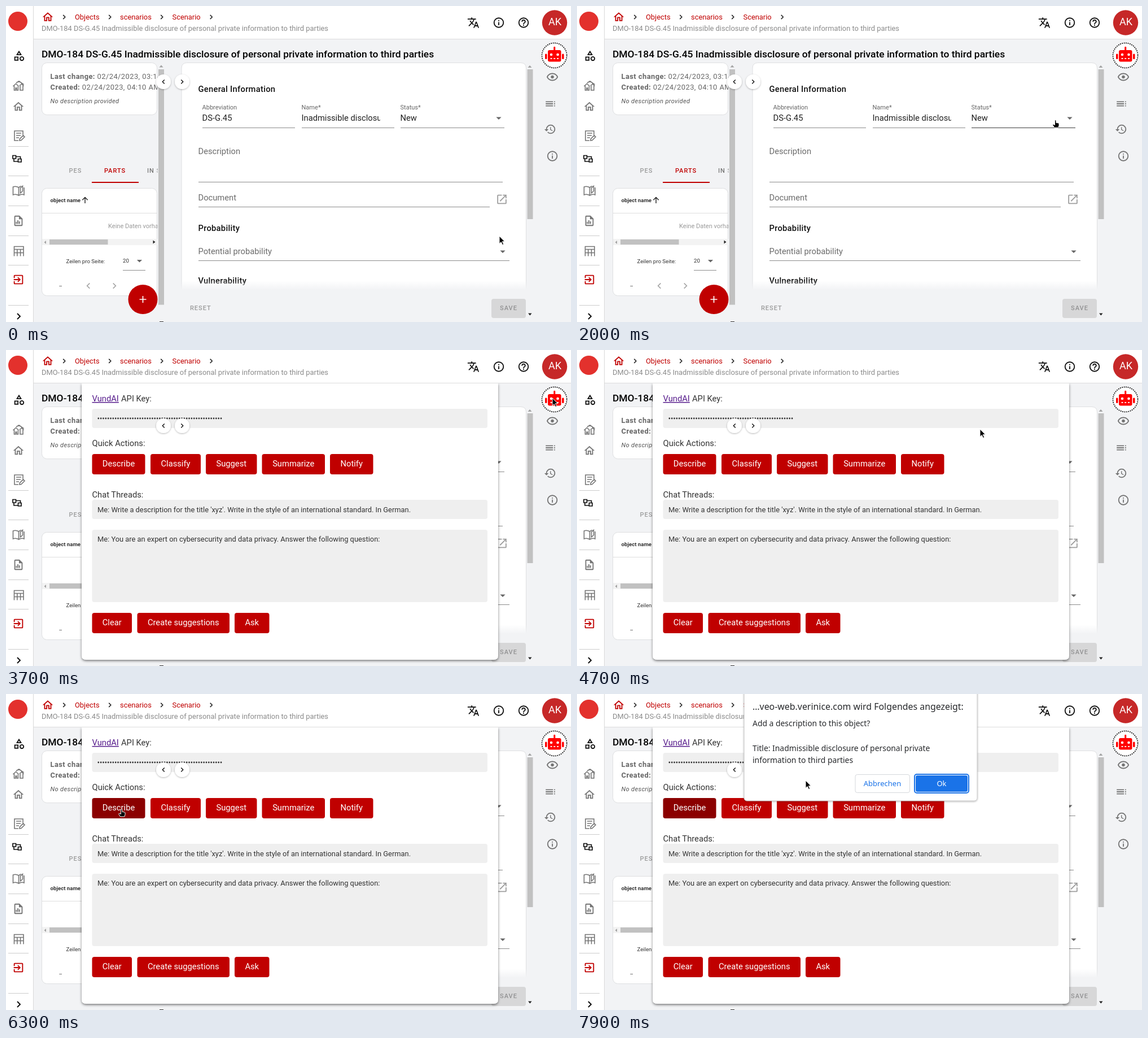
These frames come from a looping animation (1001 by 559 pixels, 8000 ms). An HTML page:

```html
<!DOCTYPE html>
<html lang="en">
<head>
<meta charset="utf-8">
<title>Scenario form</title>
<style>
html, body { margin: 0; width: 100%; height: 100%; overflow: hidden; background: #f2f3f5; }
svg { display: block; width: 100vw; height: 100vh; }
text { font: 14.72px Roboto, sans-serif; fill: #212121; white-space: pre; }
.crumb { font-size: 12.88px; fill: #c00000; }
.sub { font-size: 12.88px; fill: #8b8b8b; }
.title { font-size: 17.42px; font-weight: 500; fill: #000; }
.head { font-weight: 500; letter-spacing: .28px; fill: #111; }
.label { font-size: 11.04px; fill: #666; }
.hint { fill: #6b6b6b; }
.meta { font-size: 12.88px; letter-spacing: .45px; fill: #666; }
.meta tspan { font-weight: 700; }
.note { font-size: 11.04px; font-style: italic; letter-spacing: .37px; fill: #555; }
.cap { font-size: 11.04px; font-weight: 500; letter-spacing: .98px; fill: #9b9b9b; }
.tiny { font-size: 9.66px; fill: #333; }
.msg { font-size: 12.88px; fill: #333; }
.soft { fill: #333; }
.mid { text-anchor: middle; }
.ask text { font: 13.9px "Noto Sans", sans-serif; fill: #26282b; }
.ask .big { font-size: 15.9px; }
.ask .btn { font-size: 13px; text-anchor: middle; }
</style>
</head>
<body>
<script>
const RED = '#c00000', GREY = '#757575', LOOP = 8000, STEP = 100;

const paths = {
  home: 'M12 5.69l5 4.5V18h-2v-6H9v6H7v-7.81l5-4.5M12 3L2 12h3v8h6v-6h2v6h6v-8h3z',
  translate: 'M12.87 15.07l-2.54-2.51.03-.03A17.52 17.52 0 0 0 14.07 6H17V4h-7V2H8v2H1v2h11.17C11.5 7.92 10.44 9.75 9 11.35 8.07 10.32 7.3 9.19 6.69 8h-2c.73 1.63 1.73 3.17 2.98 4.56l-5.09 5.02L4 19l5-5 3.11 3.11zM18.5 10h-2L12 22h2l1.12-3h4.75L21 22h2zm-2.62 7l1.62-4.33L19.12 17z',
  info: 'M11 17h2v-6h-2zM12 2a10 10 0 1 0 0 20 10 10 0 0 0 0-20zm0 18a8 8 0 1 1 0-16 8 8 0 0 1 0 16zM11 9h2V7h-2z',
  help: 'M11 18h2v-2h-2zM12 2a10 10 0 1 0 0 20 10 10 0 0 0 0-20zm0 18a8 8 0 1 1 0-16 8 8 0 0 1 0 16zm0-14a4 4 0 0 0-4 4h2c0-1.1.9-2 2-2s2 .9 2 2c0 2-3 1.75-3 5h2c0-2.25 3-2.5 3-5a4 4 0 0 0-4-4z',
  eye: 'M12 9a3 3 0 1 1 0 6 3 3 0 0 1 0-6m0-4.5c5 0 9.27 3.11 11 7.5-1.73 4.39-6 7.5-11 7.5S2.73 16.39 1 12c1.73-4.39 6-7.5 11-7.5M3.18 12a9.82 9.82 0 0 0 17.64 0 9.82 9.82 0 0 0-17.64 0z',
  toc: 'M3 9h14V7H3zm0 4h14v-2H3zm0 4h14v-2H3zm16 0h2v-2h-2zm0-10v2h2V7zm0 6h2v-2h-2z',
  history: 'M13.5 8H12v5l4.28 2.54.72-1.21-3.5-2.08V8M13 3a9 9 0 0 0-9 9H1l3.96 4.03L9 12H6a7 7 0 1 1 7 7c-1.93 0-3.68-.79-4.94-2.06l-1.42 1.42A8.9 8.9 0 0 0 13 21a9 9 0 0 0 0-18',
  shapes: 'M11 13.5v8H3v-8h8m-2 2H5v4h4v-4M12 2l5.5 9h-11L12 2m0 3.86L10.08 9h3.84zM17.5 13a4.5 4.5 0 1 1 0 9 4.5 4.5 0 0 1 0-9m0 2a2.5 2.5 0 1 0 0 5 2.5 2.5 0 0 0 0-5z',
  chart: 'M14 2H6a2 2 0 0 0-2 2v16a2 2 0 0 0 2 2h12a2 2 0 0 0 2-2V8l-6-6m4 18H6V4h7v5h5v11M9 14v4H7v-4h2m6-1v5h-2v-5h2m-3-2v7h-2v-7z',
  exit: 'M19 3H5a2 2 0 0 0-2 2v4h2V5h14v14H5v-4H3v4a2 2 0 0 0 2 2h14a2 2 0 0 0 2-2V5a2 2 0 0 0-2-2M10.08 15.58L11.5 17l5-5-5-5-1.42 1.41L12.67 11H3v2h9.67z',
  open: 'M14 3v2h3.59l-9.83 9.83 1.41 1.41L19 6.41V10h2V3m-2 16H5V5h7V3H5a2 2 0 0 0-2 2v14a2 2 0 0 0 2 2h14a2 2 0 0 0 2-2v-7h-2z'
};

const text = (x, y, cls, s, extra = '') => `<text x="${x}" y="${y}" class="${cls}" ${extra}>${s}</text>`;
const rect = (x, y, w, h, fill, r = 0, extra = '') =>
  `<rect x="${x}" y="${y}" width="${w}" height="${h}" rx="${r}" fill="${fill}" ${extra}/>`;
const line = (x1, x2, y, color = '#8c8c8c', id = '') => rect(x1, y, x2 - x1, 1, color, 0, id && `id="${id}"`);
const icon = (name, cx, cy, color = GREY, k = .92) =>
  `<path transform="translate(${cx - 12 * k} ${cy - 12 * k}) scale(${k})" fill="${color}" fill-rule="evenodd" d="${paths[name]}"/>`;
const stroke = (d, color = GREY, w = 1.6) => `<path d="${d}" fill="none" stroke="${color}" stroke-width="${w}"/>`;
const chevron = (cx, cy, dir, r = 4, color = '#111', w = 1.7) =>
  stroke(`M${cx - dir * r / 2} ${cy - r}l${dir * r} ${r}l${-dir * r} ${r}`, color, w);
const caret = (cx, cy, color = '#666') => `<path d="M${cx - 4.6} ${cy - 2}h9.2l-4.6 4.6z" fill="${color}"/>`;
const tri = (d, color) => `<path d="${d}z" fill="${color}"/>`;
const round = (cx, dir) =>
  `<circle cx="${cx}" cy="134" r="13" fill="#fff" filter="url(#drop)"/>` + chevron(cx, 134, dir, 3.5, '#111', 1.4);
const button = (x1, x2, y, s) =>
  rect(x1, y, x2 - x1, 36, RED, 4, `id="${s.split(' ')[0]}"`) + text((x1 + x2) / 2, y + 22, 'mid', s, 'style="fill:#fff"');

const full = 'DMO-184 DS-G.45 Inadmissible disclosure of personal private information to third parties';

const sidebar = rect(0, 0, 48, 559, '#fff') + rect(48, 0, 1, 559, '#d9d9d9') +
  `<circle cx="21" cy="27" r="17" fill="#e3312d"/>` +
  icon('shapes', 23, 88, '#111') +
  stroke('M12.5 142l5-4.5l5 4.5M14.5 141v8h2.5v-4h2v4h2.5v-8M18 136l5-3l8.5 6M24 141l3.5-3l4 3.5M25 141v8h5v-8') +
  icon('home', 22, 178) +
  stroke('M30 228v-7h-15v17h7M18 225h9M18 229h8M18 233h5M24 238l.5-3l6-6l2.5 2.5l-6 6z') +
  stroke('M12 264.500h5.500v5.500h-5.500zM21.500 270.500h5.500v5.500h-5.500zM17.500 266.500h8v4M14 270v5h7.500', '#111', 1.7) +
  stroke('M22.5 321q-5-3-10-1v14q5-2 10 1zq5-3 4-2M22.5 335q5-3 9.5-1v-13M25.5 322v9l4-3.5v-9z') +
  icon('chart', 22, 380) +
  stroke('M14.500 425.500h16.500v5h-16.500zM14.500 430.500v12M31 430.500v12M14 436.500h17M19.800 431v11.500M25.600 431v11.500') +
  icon('exit', 22, 484, RED) + chevron(22.5, 549, 1, 5, '#111', 2) +
  [248, 300, 353, 406, 458, 529].map(y => line(4, 40, y, '#ccc')).join('');

const header = rect(49, 0, 952, 58, '#fff') + rect(49, 58, 952, 1, '#dcdcdc') +
  icon('home', 74, 19.5, RED) +
  [103, 184, 276, 363.5].map(x => chevron(x, 19.5, 1, 3.6, '#222', 1.5)).join('') +
  text(122, 24, 'crumb', 'Objects') + text(202, 24, 'crumb', 'scenarios') + text(294.5, 24, 'crumb', 'Scenario') +
  text(63, 44, 'sub', full) +
  icon('translate', 828, 29.5, '#111') + icon('info', 873, 29.5, '#111') + icon('help', 917, 29.5, '#111') +
  `<circle cx="972" cy="29.5" r="22.2" fill="#c62828"/>` +
  text(972.5, 34, 'mid', 'AK', 'style="fill:#fff;font-size:18px"');

const robot = `<circle cx="971.5" cy="87.5" r="22" fill="#fff" stroke="#111" stroke-width="1.8" stroke-dasharray="1.8 1.656"/>` +
  rect(960, 78, 23.5, 20.5, '#f00', 3) + rect(970.2, 72, 3, 8, '#f00', 1) +
  rect(955, 84.5, 3.5, 9.5, '#f00', 1.5) + rect(985, 84.5, 3.5, 9.5, '#f00', 1.5) +
  [966, 977.5].map(x => `<circle cx="${x}" cy="86" r="2.3" fill="#fff"/>`).join('') +
  [964.5, 970.2, 976].map(x => rect(x, 92, 3, 1.8, '#fff')).join('');

const tools = robot + icon('eye', 968, 125.5) + icon('toc', 964.5, 173) +
  icon('history', 964, 218) + icon('info', 968, 265.5);

const card = 'stroke="#dedfe1"';
const left = `<g clip-path="url(#leftClip)">` +
  rect(63.5, 100.5, 204, 92, '#fff', 9, card) +
  text(78.5, 129, 'meta', '<tspan>Last change:</tspan> 02/24/2023, 03:14 PM') +
  text(78.5, 148, 'meta', '<tspan>Created:</tspan> 02/24/2023, 04:10 AM') +
  text(78.5, 172, 'note', 'No description provided') +
  text(111.5, 295, 'cap', 'PES') + text(174, 295, 'cap', 'PARTS', 'style="fill:#c00000"') +
  text(250, 295, 'cap', 'IN SCOPES', 'style="fill:#777"') + rect(152, 311, 83, 2, RED) +
  rect(63.5, 322.5, 204, 190, '#fff', 9, card) +
  text(78.5, 347, 'tiny', 'object name', 'style="font-weight:700"') +
  stroke('M140 349v-10.5M135.3 343.3l4.7-4.7l4.7 4.7', '#222', 1.4) + line(64, 268, 366, '#dedede') +
  text(181, 393, 'label', 'Keine Daten vorhanden', 'style="fill:#999"') +
  rect(64, 412, 204, 11, '#f3f3f3') + rect(77, 413, 103.5, 9, '#c1c1c1') +
  tri('M71 415v6l-3.5-3', '#a3a3a3') + tri('M260.5 414.5v6l4-3', '#222') +
  text(106.5, 455, 'tiny', 'Zeilen pro Seite:') + text(207, 454, 'tiny', '20') +
  caret(236.5, 451) + line(207, 247, 467) + text(93.5, 499, 'tiny', '–') +
  chevron(146, 495, -1, 4.6, '#a6a6a6') + chevron(192, 495, 1, 4.6, '#a6a6a6') + `</g>` +
  tri('M271.5 108.5h7l-3.5-4', '#a3a3a3') + rect(270, 112, 10, 416.5, '#c1c1c1') + rect(272, 558, 7, 1, '#333') +
  `<circle cx="242.5" cy="519" r="26" fill="${RED}"/>` + stroke('M236.5 519h12M242.5 513v12', '#fff', 1.7);

const form = `<path d="M311 559V110q0-9.5 9.5-9.5H912q9.5 0 9.5 9.5V559" fill="#fff" stroke="#dedfe1"/>` +
  text(340.5, 152, 'head', 'General Information') +
  text(347.5, 183, 'label', 'Abbreviation') + text(523.5, 183, 'label', 'Name*') + text(698.5, 183, 'label', 'Status*') +
  text(347.5, 203, '', 'DS-G.45') + text(523.5, 203, '', 'Inadmissible disclosure', 'clip-path="url(#nameClip)"') +
  text(698.5, 203, '', 'New') + caret(873, 198.5) +
  line(348, 512, 215) + line(524, 688, 215) + line(699, 883, 215, '#8c8c8c', 'status') +
  text(340.5, 262, 'hint', 'Description') + line(341, 880, 311, '#8c8c8c', 'desc') +
  text(340.5, 344, 'hint', 'Document') + line(341, 857, 355) + icon('open', 878.5, 342, '#9e9e9e') +
  text(340.5, 398, 'head', 'Probability') +
  text(340.5, 439, 'hint', 'Potential probability') + caret(880, 434.5) + line(341, 892, 450) +
  text(340.5, 491, 'head', 'Vulnerability') +
  rect(308, 486, 615, 16, 'url(#fade)') + rect(308, 502, 615, 57, '#f2f3f5') +
  text(326, 538, 'cap', 'RESET') + rect(860, 518, 61, 34, '#d7d7d8', 4) +
  text(875, 538, 'cap', 'SAVE', 'style="fill:#929293"') +
  tri('M924.5 109h7l-3.5-4', '#a3a3a3') + rect(923.5, 112, 10, 265, '#c1c1c1') + tri('M925 543.5h6.5l-3.25 4', '#222');

const modal = `<g id="modal"><path d="M134 59H872V540q0 8-8 8H142q-8 0-8-8z" fill="#fff" filter="url(#deep)"/>` +
  text(152.5, 91, '', 'VundAI', 'style="fill:#551a8b;text-decoration:underline"') + text(204, 91, 'soft', 'API Key:') +
  rect(152.5, 104, 700.5, 34, '#efefef', 4) +
  `<path d="M163.8 121H381.5" stroke="#333" stroke-width="2.8" stroke-linecap="round" stroke-dasharray="0 4.345"/>` +
  text(152.5, 170, 'soft', 'Quick Actions:') +
  button(152.5, 246.5, 184, 'Describe') + button(256, 345, 184, 'Classify') + button(354, 444.5, 184, 'Suggest') +
  button(453.5, 565, 184, 'Summarize') + button(574, 650.5, 184, 'Notify') +
  text(152.5, 261, 'soft', 'Chat Threads:') + rect(152.5, 265, 700.5, 34, '#efefef', 4) +
  text(162, 287, 'msg', "Me: Write a description for the title 'xyz'. Write in the style of an international standard. In German.") +
  rect(152.5, 318, 700.5, 128, '#efefef', 4) +
  text(162, 339, 'msg', 'Me: You are an expert on cybersecurity and data privacy. Answer the following question:') +
  button(152.5, 223, 465, 'Clear') + button(232.5, 396, 465, 'Create suggestions') + button(405, 466.5, 465, 'Ask') + `</g>`;

const ask = `<g id="ask" class="ask">` + rect(296, -12, 413, 201, '#fff', 5, 'stroke="#c4c4c4" filter="url(#drop)"') +
  text(311, 28, 'big', '…veo-web.verinice.com wird Folgendes angezeigt:') +
  text(311, 57, '', 'Add a description to this object?') +
  text(311, 101, '', 'Title: Inadmissible disclosure of personal private') + text(311, 122, '', 'information to third parties') +
  rect(493, 142.5, 96.5, 32, '#fff', 3.5, 'stroke="#d5d8dc"') + text(541, 163, 'btn', 'Abbrechen', 'style="fill:#1a73e8"') +
  rect(598, 142, 96, 33, '#fff', 4, 'stroke="#1a73e8" stroke-width="2"') +
  rect(600, 144, 92, 29, '#1a73e8', 3) + text(646, 163, 'btn', 'Ok', 'style="fill:#fff"') + `</g>`;

const outline = 'fill="#000" stroke="#fff" stroke-width="1" stroke-linejoin="round"';
const pointer = `<g id="cursor">` +
  `<path id="arrow" ${outline} d="M0 0V13.5L3.2 10.6L5.5 15.6L7.7 14.6L5.4 9.7H9.6z"/>` +
  `<path id="hand" ${outline} d="M-1.5 .5Q0-1.2 1 .5V4.5Q6 4.5 6 6V9.5L4.8 13H-2.5L-5.2 8.5Q-5.5 6.5-3 7.5L-1.5 8.5z"/>` +
  `<g id="beam"><path d="M-3-6H3M0-6V6M-3 6H3" fill="none" stroke="#fff" stroke-width="3"/>` +
  stroke('M-3.5-6.5H-1L0-5.5L1-6.5H3.5M0-5.5V5.5M-3.5 6.5H-1L0 5.5L1 6.5H3.5', '#222', 1.2) + `</g></g>`;

document.body.innerHTML = `<svg viewBox="0 0 1001 559" preserveAspectRatio="none"><defs>
  <clipPath id="leftClip"><path d="M60 59H268.5V559H60z"/></clipPath>
  <clipPath id="nameClip"><path d="M520 185H663V212H520z"/></clipPath>
  <linearGradient id="fade" x2="0" y2="1"><stop stop-color="#f2f3f5" stop-opacity="0"/><stop offset="1" stop-color="#f2f3f5"/></linearGradient>
  <filter id="drop" x="-30%" y="-30%" width="160%" height="160%"><feDropShadow dx="0" dy="1" stdDeviation="1.5" flood-opacity=".3"/></filter>
  <filter id="deep"><feDropShadow dx="0" dy="2" stdDeviation="2" flood-opacity=".5"/></filter></defs>` +
  rect(0, 0, 1001, 559, '#f2f3f5') + text(63, 91, 'title', full) + left + form + modal +
  round(279, -1) + round(312, 1) + header + sidebar + tools + ask + pointer + `</svg>`;

// time, x, y of the pointer
const track = [
  [400, 874, 407], [500, 873, 402], [700, 862, 340], [900, 846, 259], [1100, 844, 210], [1300, 846, 194], [1400, 846, 195],
  [1900, 846, 195], [2000, 848, 202], [2100, 856, 207], [2400, 924, 106], [2700, 924, 106], [2800, 968, 85],
  [4100, 968, 85], [4200, 961, 86], [4400, 888, 102], [4700, 714, 140], [4900, 570, 160], [5000, 523, 163],
  [5100, 514, 164], [5300, 466, 171], [5500, 378, 182], [5800, 251, 199], [5900, 222, 203], [6100, 205, 204],
  [7300, 205, 204], [7400, 228, 199], [7600, 500, 172], [7700, 564, 166], [7900, 405, 153]
];
const $ = id => document.getElementById(id);
const clamp = v => Math.max(0, Math.min(1, v));
const within = (v, a, b) => v >= a && v < b;

function place(t) {
  const i = track.findIndex(k => k[0] > t);
  if (i === 0) return track[0].slice(1);
  if (i < 0) return track[track.length - 1].slice(1);
  const [a, b] = [track[i - 1], track[i]], p = (t - a[0]) / (b[0] - a[0]);
  return [a[1] + (b[1] - a[1]) * p, a[2] + (b[2] - a[2]) * p].map(Math.round);
}

function shape(t, x, y) {
  if (t < 3700) {
    if (within(x, 699, 884) && y < 218) return 'hand';
    return within(y, 243, 312) && x < 880 ? 'beam' : 'arrow';
  }
  if (t >= 7400) return 'arrow';
  if (within(y, 104, 138) && x < 853) return 'beam';
  return within(y, 184, 220) && (x < 246 || within(x, 256, 345)) ? 'hand' : 'arrow';
}

const tint = v => `rgb(${192 - 53 * v},0,0)`;

function draw(now) {
  const t = Math.floor(now % LOOP / STEP) * STEP;
  const [x, y] = place(t), kind = shape(t, x, y);
  $('cursor').setAttribute('transform', `translate(${x} ${y})`);
  for (const k of ['arrow', 'hand', 'beam']) $(k).style.display = k === kind ? '' : 'none';
  $('desc').setAttribute('fill', within(t, 800, 1000) ? '#3c3c3c' : '#8c8c8c');
  $('status').setAttribute('fill', within(t, 1100, 2200) ? '#3c3c3c' : '#8c8c8c');
  $('modal').style.display = t >= 3700 ? '' : 'none';
  $('Classify').setAttribute('fill', tint(clamp((t - 5500) / 300) - clamp((t - 5800) / 400)));
  $('Describe').setAttribute('fill', tint(clamp((t - 5800) / 500)));
  $('ask').style.opacity = t < 6900 ? 0 : t < 7000 ? .5 : 1;
}

function loop() {
  draw(performance.now());
  requestAnimationFrame(loop);
}
loop();
</script>
</body>
</html>
```
